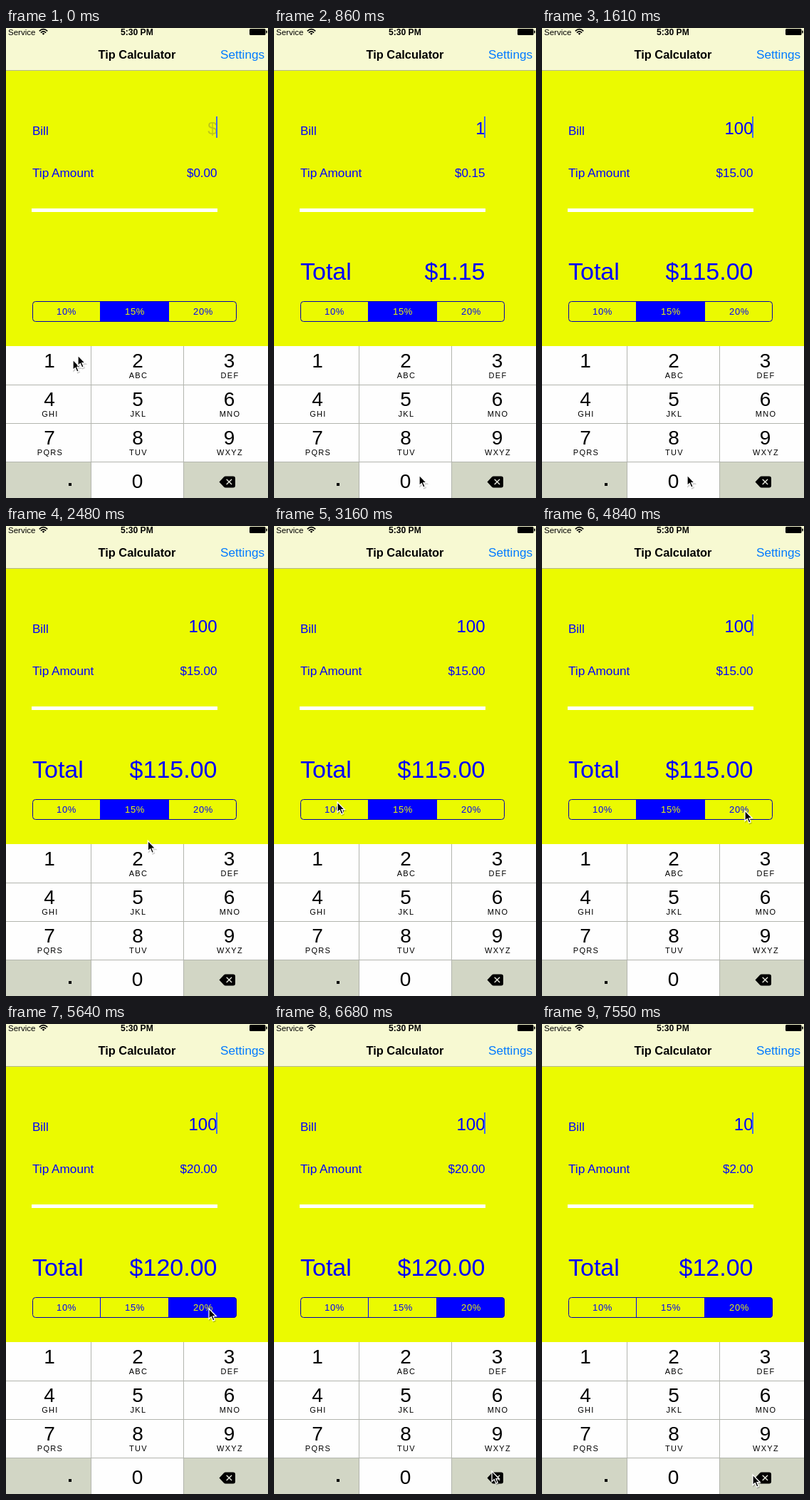
An HTML page that plays this animation: 368 px wide and 659 px high, repeating every 8 s.

```html
<!DOCTYPE html>
<html lang="en">
<head>
<meta charset="utf-8">
<title>Tip Calculator</title>
<style>
  html, body { margin: 0; width: 100%; height: 100%; overflow: hidden; background: #ebfa00; }
  svg { display: block; width: 100%; height: 100%; font-family: "Liberation Sans", Arial, sans-serif; }
  .blue { fill: #00f; }
  .end { text-anchor: end; font-kerning: none; }
  .mid { text-anchor: middle; }
  .bold { font-weight: 700; }
</style>
</head>
<body>
<svg id="stage" viewBox="0 0 368 659">
  <rect width="368" height="659" fill="#ebfa00"/>

  <rect width="368" height="59" fill="#f7f9d2"/>
  <rect y="59" width="368" height="1" fill="#b4b78c"/>
  <text x="3" y="10" font-size="11.5">Service</text>
  <g fill="none" stroke="#000" stroke-width="1.7">
    <path d="M46.8 4.4Q52.5 -1 58.2 4.4M48.9 6.6Q52.5 3.2 56.1 6.6"/>
    <path d="M52.5 9.8L50.6 7.8Q52.5 6.3 54.4 7.8Z" fill="#000" stroke="none"/>
  </g>
  <text x="161" y="10" font-size="12.1" class="bold">5:30 PM</text>
  <rect x="342" y="1" width="22.5" height="9" rx="1.5"/>
  <rect x="365.2" y="3.5" width="1.6" height="4" rx=".8"/>
  <text x="129.5" y="43" font-size="16.4" class="bold">Tip Calculator</text>
  <text x="301" y="43" font-size="17.2" fill="#007aff">Settings</text>

  <g class="blue" font-size="17">
    <text x="37" y="150">Bill</text>
    <text x="37" y="209" font-size="17.2">Tip Amount</text>
    <text id="tip" class="end" x="296.5" y="209"></text>
  </g>
  <text id="bill" class="end" x="296.5" y="148.5" font-size="24"></text>
  <rect id="caret" x="295" y="124" width="2" height="30" fill="#426bf2"/>
  <rect x="36" y="253" width="261" height="5" fill="#fff"/>
  <g id="sum" class="blue" font-size="34">
    <text x="37" y="353">Total</text>
    <text id="total" class="end" x="296.5" y="353"></text>
  </g>

  <g id="tabs" font-size="13" letter-spacing=".6"></g>
  <g id="pad"></g>

  <g id="ghost"></g>
  <g id="mouse"></g>
</svg>
<script>
const LOOP = 8000;
const $ = id => document.getElementById(id);

function add(parent, tag, attrs, text) {
  const el = document.createElementNS("http://www.w3.org/2000/svg", tag);
  for (const key in attrs) el.setAttribute(key, attrs[key]);
  if (text) el.textContent = text;
  parent.append(el);
  return el;
}

// Segmented control
const tabPaths = [
  "M132.5 383H41.5a4.5 4.5 0 0 0-4.5 4.5v20a4.5 4.5 0 0 0 4.5 4.5H132.5Z",
  "M132 383H229V412H132Z",
  "M228.5 383H319.5a4.5 4.5 0 0 1 4.5 4.5v20a4.5 4.5 0 0 1-4.5 4.5H228.5Z"
];
const tabs = tabPaths.map((d, i) => {
  const x = 85 + i * 96, label = 10 + i * 5 + "%";
  add($("tabs"), "text", { x, y: 402, class: "mid blue" }, label);
  const on = add($("tabs"), "g", {});
  add(on, "path", { d, class: "blue" });
  add(on, "text", { x, y: 402, class: "mid", fill: "#ebfa00" }, label);
  return on;
});
add($("tabs"), "path", { d: "M132.5 383V412M228.5 383V412", stroke: "#00f" });
add($("tabs"), "rect", { x: 37.5, y: 383.5, width: 286, height: 28, rx: 4, fill: "none", stroke: "#0000b4" });

// Number pad
const GRAY = "#d2d6c5", WHITE = "#fefefe";
const cols = [0, 120, 250, 368], rows = [446, 501, 555, 609, 659];
const centers = [61, 185, 313.5];
const letters = ["", "ABC", "DEF", "GHI", "JKL", "MNO", "PQRS", "TUV", "WXYZ"];
const pad = $("pad"), keys = [];
for (let i = 0; i < 12; i++) {
  const c = i % 3, r = Math.floor(i / 3);
  keys.push(add(pad, "rect", {
    x: cols[c], y: rows[r], width: cols[c + 1] - cols[c], height: rows[r + 1] - rows[r]
  }));
  if (i < 9) {
    add(pad, "text", { x: centers[c], y: 476 + r * 54, class: "mid", "font-size": 28 }, String(i + 1));
    add(pad, "text", { x: centers[c] + 1, y: 491 + r * 54, class: "mid", "font-size": 11, "letter-spacing": 1.3 }, letters[i]);
  }
}
add(pad, "path", {
  d: "M0 500.5H368M0 554.5H368M0 608.5H368M119.5 446V659M249.5 446V659",
  stroke: "#b3b5ae"
});
add(pad, "text", { x: 184.5, y: 645, class: "mid", "font-size": 28 }, "0");
add(pad, "rect", { x: 88, y: 638, width: 4, height: 4 });
add(pad, "path", { d: "M299.5 636.5L306 629.5Q307 628.5 308.5 628.5H319Q322 628.5 322 631.5V641.5Q322 644.5 319 644.5H308.5Q307 644.5 306 643.5Z" });
add(pad, "path", { d: "M309.7 632.7L317.1 640.1M317.1 632.7L309.7 640.1", stroke: "#e8eadf", "stroke-width": 1.4 });

// Pointer
for (const id of ["ghost", "mouse"]) {
  const d = "M0 0V14.6L3.3 11.6L5.7 17.2L8.2 16.1L5.9 10.7H10.4Z";
  add($(id), "path", { d, transform: "translate(1 1.5)", opacity: .18, stroke: "#000", "stroke-width": 1.5 });
  add($(id), "path", { d, stroke: "#fff", "stroke-width": 1.3 });
}

// time, x, y
const route = [
  [0, 101, 459], [60, 94, 465], [340, 94, 465], [760, 204, 627],
  [1900, 204, 627], [2590, 199, 428], [3040, 89, 387],
  [3930, 89, 387], [4400, 178, 397], [4650, 182, 397], [4810, 285, 399],
  [5680, 285, 399], [5900, 322, 500], [6100, 338, 607], [6160, 334, 612],
  [6430, 306, 627], [6680, 306, 627], [6940, 296, 632]
];
// time, bill, selected tab
const states = [
  [0, "", 1], [240, "1", 1], [1040, "10", 1], [1400, "100", 1],
  [3540, "100", 0], [4540, "100", 1], [5420, "100", 2], [7400, "10", 2]
];
// key index, from, to
const presses = [[0, 120, 300], [10, 920, 1100], [10, 1300, 1480], [11, 7330, 7520]];

const clamp = v => Math.max(0, Math.min(1, v));
const ramp = (t, a, b) => clamp((t - a) / (b - a));
const money = v => "$" + v.toFixed(2);
const last = (list, t) => list.reduce((n, s, i) => s[0] <= t ? i : n, 0);

function pointerAt(t) {
  const i = last(route, t), a = route[i], b = route[i + 1] || a;
  const still = a === b;
  const k = still ? 0 : ramp(t, a[0], b[0]);
  const bend = i >= 11 && i <= 14;
  const e = bend ? k : k * k * (3 - 2 * k);
  return [a[1] + (b[1] - a[1]) * e, a[2] + (b[2] - a[2]) * e];
}

function caretAt(t) {
  if (t < 1700 || t > 7472) return 1;
  const period = 968;
  const d = (t - 3300 + period * 2.5) % period - period / 2;
  return d < 0 ? 1 - ramp(d, -420, -140) : ramp(d, 150, 300);
}

function draw(t) {
  const i = last(states, t), [start, bill, tab] = states[i];
  const before = states[Math.max(0, i - 1)][2];
  const mix = before === tab ? 1 : ramp(t, start, start + 140);
  tabs.forEach((el, n) => {
    el.setAttribute("opacity", n === tab ? mix : n === before ? 1 - mix : 0);
  });

  const tip = bill * (10 + tab * 5) / 100;
  $("bill").textContent = bill || "$";
  $("bill").setAttribute("fill", bill ? "#00f" : "#bdc619");
  $("tip").textContent = money(tip);
  $("total").textContent = money(+bill + tip);
  $("sum").setAttribute("opacity", ramp(t, 240, 480));
  $("caret").setAttribute("opacity", caretAt(t));

  keys.forEach((el, n) => {
    const down = presses.some(p => p[0] === n && t >= p[1] && t < p[2]);
    const side = n === 9 || n === 11;
    el.setAttribute("fill", down !== side ? GRAY : WHITE);
  });

  $("mouse").setAttribute("transform", `translate(${pointerAt(t)})`);
  $("ghost").setAttribute("transform", "translate(94 465)");
  $("ghost").setAttribute("opacity", t < 60 ? 1 : 0);
}

const begin = performance.now();
function tick() {
  draw((performance.now() - begin) % LOOP);
  requestAnimationFrame(tick);
}
tick();
</script>
</body>
</html>
```
